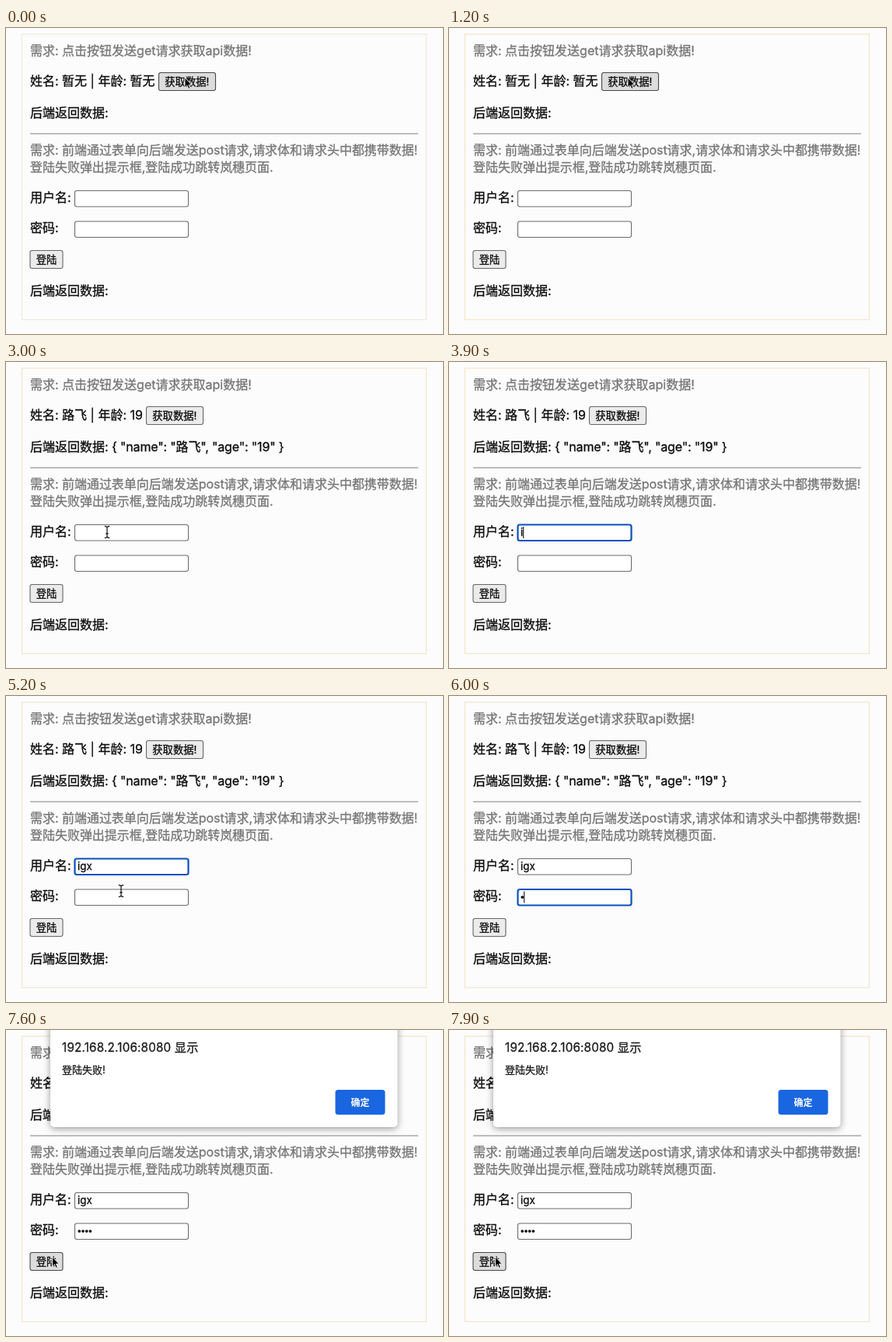
Animation of 562 by 394 pixels, one loop 8 s. Source, as an HTML page:

```html
<!DOCTYPE html>
<html lang="zh-CN">
<head>
<meta charset="utf-8">
<style>
html, body { margin: 0; width: 100%; height: 100%; overflow: hidden; background: #fcfcfc; }
svg { display: block; width: 562px; height: 394px; font: 16px Inter, "Noto Sans CJK SC", "Noto Sans CJK", sans-serif; }
text { white-space: pre; fill: #0c0c0c; stroke: #0c0c0c; stroke-width: .3; }
.note { fill: #767676; stroke: #767676; }
.small { font-size: 13.33px; }
.field { fill: #fff; stroke: #6c6c6c; stroke-width: 1.1; }
.field.focus { stroke: #0b50bc; stroke-width: 2.2; }
.btn rect { fill: #ebebeb; stroke: #666; stroke-width: 1.1; }
.btn.hover rect { fill: #dcdcdc; stroke: #484848; }
#dialog { filter: drop-shadow(0 2px 5px rgba(0, 0, 0, .4)); }
#dialog text { fill: #1c1c1c; stroke: #1c1c1c; }
#dialog .ok { fill: #fff; stroke: none; font-weight: 600; }
</style>
</head>
<body>
<svg viewBox="0 0 562 394">
  <rect id="frame" x="20.5" y="8" width="520" height="367.5" fill="none" stroke-width="1.3"/>
  <text class="note" x="31" y="35.3">需求: 点击按钮发送get请求获取api数据!</text>
  <text id="person" x="31" y="74"></text>
  <g id="fetch" class="btn">
    <rect x=".5" y="57.5" width="73" height="23" rx="2.5"/>
    <text class="small" x="8.3" y="73.7">获取数据!</text>
  </g>
  <text x="31" y="114.5">后端返回数据:<tspan id="json" letter-spacing="-.16"></tspan></text>
  <path d="M31 136.2H530" stroke="#999" stroke-width="1.3"/>
  <text class="note" x="31" y="162.5" letter-spacing="-.03">需求: 前端通过表单向后端发送post请求,请求体和请求头中都携带数据!</text>
  <text class="note" x="31" y="185" letter-spacing="-.03">登陆失败弹出提示框,登陆成功跳转岚穗页面.</text>
  <text x="31" y="223.5">用户名:</text>
  <rect id="userBox" class="field" x="88.5" y="209.5" width="146" height="20.5" rx="2.5"/>
  <text id="user" class="small" x="92" y="223.7"></text>
  <text x="31" y="263">密码:</text>
  <rect id="passBox" class="field" x="88.5" y="249" width="146" height="20.5" rx="2.5"/>
  <g id="dots"></g>
  <rect id="caret" width="1" height="15"/>
  <g id="login" class="btn">
    <rect x="31" y="286.5" width="42" height="23" rx="2.5"/>
    <text class="small" x="38.7" y="302.7">登陆</text>
  </g>
  <text x="31" y="343.5">后端返回数据:</text>
  <g id="dialog">
    <rect x="57" y="-12" width="446.5" height="137" rx="5" fill="#fff"/>
    <text x="72" y="27.5" font-size="15.2" letter-spacing=".2">192.168.2.106:8080 显示</text>
    <text x="72" y="56.3" font-size="13">登陆失败!</text>
    <rect x="423.5" y="77" width="64" height="32" rx="3.5" fill="#1a66e0"/>
    <text class="ok" x="455.5" y="97.5" font-size="12" text-anchor="middle">确定</text>
  </g>
  <g id="cursor">
    <path id="arrow" d="M0 0V12.6L2.9 9.9 4.9 14.4 6.9 13.5 5 9.2H8.8Z" fill="#000" stroke="#fff" stroke-width=".9"/>
    <path id="beam" d="M-3.2 -7.5Q0 -7.5 0 -5.5Q0 -7.5 3.2 -7.5M0 -5.5V5.5M-3.2 7.5Q0 7.5 0 5.5Q0 7.5 3.2 7.5M-1.7 2H1.7" fill="none" stroke="#222" stroke-width="1.3"/>
  </g>
</svg>
<script>
const $ = id => document.getElementById(id);
const show = (id, on) => $(id).style.display = on ? '' : 'none';
const LOOP = 8000, LOADED = 1800, FOCUS_USER = 3500, FOCUS_PASS = 5400, ALERT = 7500;
const userKeys = [3900, 4100, 4300], passKeys = [6000, 6200, 6400, 6600];
// time, x, y of the pointer
const path = [
  [0, 230, 64], [1800, 230, 64], [2200, 166, 148], [2900, 130, 219],
  [4600, 130, 219], [5200, 148, 251], [5400, 141, 259],
  [6650, 141, 259], [6900, 108, 288], [7200, 59.5, 292], [LOOP, 59.5, 292]
];

$('dots').innerHTML = passKeys.map((_, i) => `<circle cx="${94.3 + 4.7 * i}" cy="259" r="1.85"/>`).join('');

function pointer(t) {
  const i = path.findIndex(p => p[0] > t), [t0, x0, y0] = path[i - 1], [t1, x1, y1] = path[i];
  const k = (t - t0) / (t1 - t0), e = k * k * (3 - 2 * k);
  return [x0 + (x1 - x0) * e, y0 + (y1 - y0) * e];
}

function draw(t) {
  const loaded = t >= LOADED;
  const inUser = t >= FOCUS_USER && t < FOCUS_PASS, inPass = t >= FOCUS_PASS && t < ALERT;
  const typed = keys => keys.filter(k => k <= t).length;

  $('frame').setAttribute('stroke', t < 900 ? '#f0ece2' : '#f6e6cd');
  $('person').textContent = loaded ? '姓名: 路飞 | 年龄: 19' : '姓名: 暂无 | 年龄: 暂无';
  $('json').textContent = loaded ? ' { "name": "路飞", "age": "19" }' : '';
  $('fetch').setAttribute('transform', `translate(${loaded ? 180 : 196})`);
  $('fetch').classList.toggle('hover', t < 1950);
  $('login').classList.toggle('hover', t >= 7150);

  $('userBox').classList.toggle('focus', inUser);
  $('passBox').classList.toggle('focus', inPass);
  $('user').textContent = 'igx'.slice(0, typed(userKeys));
  [...$('dots').children].forEach((d, i) => d.style.display = i < typed(passKeys) ? '' : 'none');

  const last = Math.max(...[FOCUS_USER, FOCUS_PASS, ...userKeys, ...passKeys].filter(k => k <= t));
  show('caret', (inUser || inPass) && Math.floor((t - last) / 500) % 2 === 0);
  $('caret').setAttribute('x', inPass ? 91.5 + 4.7 * typed(passKeys) : 92 + $('user').getComputedTextLength());
  $('caret').setAttribute('y', inPass ? 251.5 : 212);

  show('dialog', t >= ALERT);

  const [x, y] = pointer(t), isBeam = t > 2000 && t < 6780;
  const hidden = (t >= 3900 && t < 4600) || (t >= 6000 && t < 6650);
  show('cursor', !hidden);
  show('arrow', !isBeam);
  show('beam', isBeam);
  $('cursor').setAttribute('transform', `translate(${x} ${y})`);
}

const start = performance.now();
function tick() {
  draw((performance.now() - start) % LOOP);
  requestAnimationFrame(tick);
}
tick();
</script>
</body>
</html>
```
